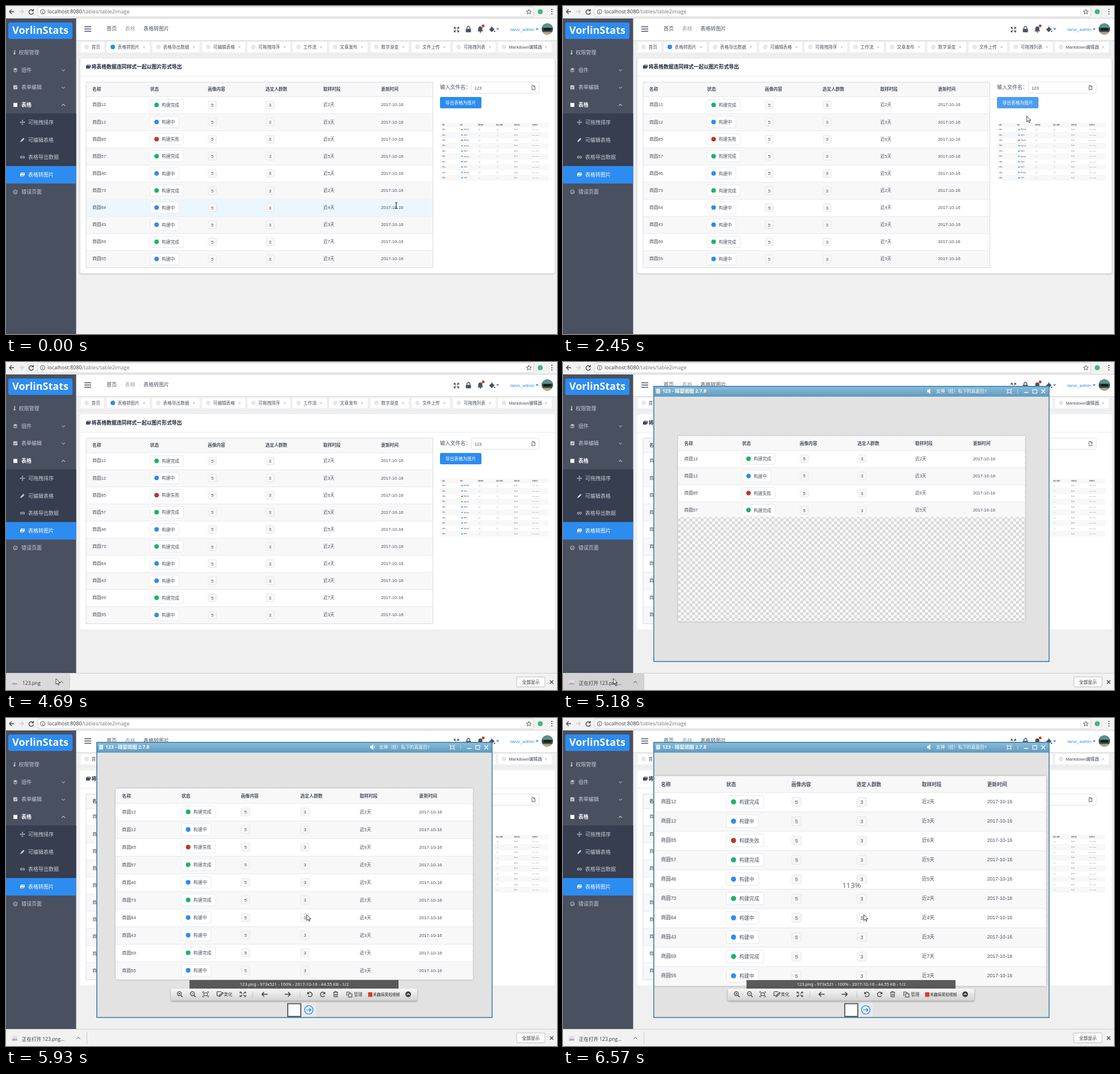
An HTML page that plays this animation: 970x577 px, repeating every 6670 ms.

```html
<!DOCTYPE html>
<html lang="zh">
<head>
<meta charset="utf-8">
<style>
html, body { margin: 0; width: 100%; height: 100%; overflow: hidden; background: #f0f0f0; }
svg { display: block; width: 100%; height: 100%; }
text { font-family: 'Liberation Sans', 'Noto Sans CJK SC', 'Noto Sans CJK', sans-serif; white-space: pre; }
.ui { font-family: 'Open Sans', 'Noto Sans CJK SC', 'Noto Sans CJK', sans-serif; }
.info { font-family: 'Noto Sans', sans-serif; }
</style>
</head>
<body>
<svg id="stage" viewBox="0 0 970 577"></svg>
<script>
const LOOP = 6670, BLUE = '#2d8cf0', INK = '#495060', LINE = '#e3e5e8';
const COLS = [152, 253.7, 355.2, 456.8, 558.5, 660.2];
const ROW = 30.1, TOP = 159.5;

// Drawing helpers; text is placed by its vertical centre.
const text = (x, y, s, size = 7.7, fill = INK, more = '') =>
  `<text x="${x}" y="${y + size * .36}" font-size="${size}" fill="${fill}" ${more}>${s}</text>`;
const rect = (x, y, w, h, fill, more = '') =>
  `<rect x="${x}" y="${y}" width="${w}" height="${h}" fill="${fill}" ${more}/>`;
const dot = (x, y, r, fill, more = '') => `<circle cx="${x}" cy="${y}" r="${r}" fill="${fill}" ${more}/>`;
const line = (d, color = INK, w = 1, more = '') =>
  `<path d="${d}" fill="none" stroke="${color}" stroke-width="${w}" ${more}/>`;
const shape = (d, fill = INK, more = '') => `<path d="${d}" fill="${fill}" ${more}/>`;
const at = (x, y, body) => `<g transform="translate(${x} ${y})">${body}</g>`;
const group = (id, body, more = '') => `<g id="${id}" ${more}>${body}</g>`;
const border = (c, r = 2) => `stroke="${c}" stroke-width=".8" rx="${r}"`;
const cross = (x, y, r, color, w) =>
  line(`M${x - r} ${y - r}l${2 * r} ${2 * r}m0 ${-2 * r}l${-2 * r} ${2 * r}`, color, w);
const chevron = (x, y, up, color) => line(`M${x - 3} ${y + up}l3 ${-2 * up * 1.4}l3 ${2 * up * 1.4}`, color, 1);
const picture = color =>
  line('M-2.5 -1.5V-3H3.5V1.5', color, 1) + rect(-4, -1.6, 6.5, 4.6, color) + shape('M-3 2l1.5-2 1.2 1 1-.8 1 1.8z', '#777e8c');

function browserBar() {
  return rect(0, 0, 970, 22, '#f2f2f2') + rect(56, 1.5, 873, 17.5, '#fff', border('#c4c4c4')) +
    line('M0 21.5H970', '#d0d0d0') +
    line('M14 10H6M10 6L6 10l4 4', '#444', 1.3) + line('M23 10h8M27 6l4 4-4 4', '#ccc', 1.3) +
    group('reload', line('M47.5 8A4 4 0 1 0 48.3 11.5', '#444', 1.4) + shape('M48.8 5v4.2h-4.2z', '#444')) +
    group('stop', cross(44, 10, 3.4, '#444', 1.4)) +
    dot(64.5, 10, 4, 'none', 'stroke="#555" stroke-width="1"') + line('M64.5 9.5v3M64.5 7.5v1', '#555', 1) +
    text(73, 10, 'localhost:8080<tspan fill="#777">/tables/table2image</tspan>', 9, '#333', 'class="ui"') +
    line('M920.5 5.8l1.2 3 3.2.2-2.5 2 .8 3.1-2.7-1.7-2.7 1.7.8-3.1-2.5-2 3.2-.2z', '#444', .9) +
    dot(940.5, 10, 4.5, '#41b883') + [6, 10, 14].map(y => dot(961, y, 1, '#444')).join('');
}

function sidebar() {
  const soft = '#c9ccd2', W = 123.5;
  const icons = [
    at(15, 81.5, line('M0-4V1M0-3h1.5M0-1h1.5', soft, 1) + dot(0, 2.2, 1.6, soft)),
    at(16.5, 112.5, shape('M0-3.5L4-1.5 0 .5-4-1.5z', soft) + line('M-3.6.6L0 2.4 3.6.6M-3.6 2L0 3.8 3.6 2', soft, .8)),
    at(16.5, 143, rect(-3.5, -3.5, 7, 7, soft) + line('M-2 0l1.5 1.6L2.3-1.6', INK, 1)),
    rect(13, 170.5, 7, 7, '#fff'),
    at(29, 204.5, line('M-4 0H4M0-4V4M-2.8-1.2L-4 0l1.2 1.2M2.8-1.2L4 0 2.8 1.2M-1.2-2.8L0-4l1.2 1.2M-1.2 2.8L0 4l1.2-1.2', soft, .9)),
    at(29, 235.5, shape('M-3.8 3.8l.7-2.6L1.6-3.5 3.5-1.6-1.2 3.1z', soft)),
    at(29, 266, line('M-.5-1.8H-2a1.8 1.8 0 0 0 0 3.6h1.2M.5-1.8H2a1.8 1.8 0 0 1 0 3.6H.8M-1.8 0h3.6', soft, 1)),
    at(29, 296.5, picture('#fff')),
    at(16.5, 327, dot(0, 0, 3.4, 'none', `stroke="${soft}"`) + line('M-1.5-1h.8M.7-1h.8M-1.5 1.7q1.5-1.8 3 0', soft, .9)),
  ];
  const items = [[22.5, 81.5, '权限管理'], [27, 112.5, '组件'], [27, 143, '表单编辑'], [39, 204.5, '可拖拽排序'],
    [39, 235.5, '可编辑表格'], [39, 266, '表格导出数据'], [27, 327, '错误页面']];
  return rect(0, 22, W, 555, INK) + rect(0, 189, W, 93, '#363e4f') + rect(0, 281.5, W, 30.8, BLUE) +
    rect(4, 29, 113, 29, BLUE, 'rx="3"') +
    text(60.5, 43, 'VorlinStats', 18, '#fff', 'class="ui" font-weight="700" text-anchor="middle"') +
    icons.join('') + items.map(([x, y, s]) => text(x, y, s, 9, soft)).join('') +
    text(27, 174, '表格', 9, '#fff', 'font-weight="700"') + text(39, 296.5, '表格转图片', 9, '#fff', 'font-weight="500"') +
    chevron(101, 112.5, -1, soft) + chevron(101, 143, -1, soft) + chevron(101, 174.5, 1, '#fff');
}

function header() {
  const icons = at(793, 41.5, line('M-1 -1L-4-4M1-1L4-4M-1 1L-4 4M1 1L4 4', INK, 1.2) +
      line('M-4-1.5V-4h2.5M4-1.5V-4H1.5M-4 1.5V4h2.5M4 1.5V4H1.5', INK, 1.3)) +
    at(814, 41, rect(-4.5, -.8, 9, 6, INK, 'rx=".8"') + line('M-2.6 0V-2.4a2.6 2.6 0 0 1 5.2 0V0', INK, 1.3)) +
    at(835, 41, shape('M-5 3.5l1.4-2V-1.5a3.6 3.6 0 0 1 7.2 0V1.5l1.4 2z') + dot(0, 4.6, 1.3, INK)) +
    dot(840, 35, 2.5, '#d0401c') +
    at(855.5, 41, shape('M-5 .5L0-4.5 4.5 0-.5 5z') + line('M0-4.5l-1.5-1.2', INK, 1) + dot(4.6, 3.5, 1.2, INK));
  const caret = x => shape(`M${x - 2.7} 39.3h5.4l-2.7 3.2z`, BLUE);
  return rect(123, 22, 847, 38, '#fff') + rect(123, 60, 847, 1.4, '#dedede') +
    line('M138 36.5h12M138 40.5h12M138 44.5h12', INK, 1.4) +
    text(177, 40, '首页', 9, INK, 'font-weight="500"') + text(202, 40, '/', 8, '#dddee1') + text(209.5, 40, '表格', 9, '#9a9fa8') +
    text(234.5, 40, '/', 8, '#dddee1') + text(242, 40, '表格转图片', 9, INK, 'font-weight="500"') +
    icons + caret(865.5) + text(888, 41, 'tarvo_admin', 7.7, BLUE) + caret(935) +
    dot(953, 40.5, 10, '#34504c') + shape('M943.3 38a10 10 0 0 1 19.4 0z', '#5d9189') +
    rect(946, 39, 14, 4, '#151c1c', 'rx="2"') + shape('M944.5 45.8h17a10 10 0 0 1-17 0z', '#b8a884');
}

function tabs() {
  const names = ['首页', '表格转图片', '表格导出数据', '可编辑表格', '可拖拽排序', '工作流', '文章发布', '数字渐变', '文件上传', '可拖拽列表', 'Markdown编辑器'];
  const starts = [131, 177, 257, 345, 424.5, 504, 568.5, 641, 713.5, 786, 865.7];
  return rect(123, 61, 847, 25, '#f0f0f0') + line('M123 85.5H970', '#e6e6e6') + names.map((s, i) => {
    const x = starts[i], w = i == 10 ? 57.5 : s.length * 7.7, end = x + 19.5 + w;
    return rect(x, 62.5, i ? w + 38 : 42.5, 19.5, '#fff', border('#e9eaec', 1.5)) +
      dot(x + 11, 72, 4, i == 1 ? BLUE : '#e6e7e9') + text(x + 19.5, 72.3, s) +
      (i ? cross(end + 8, 72.3, 1.8, '#aaa', .8) : '');
  }).join('');
}

// Table backdrop and contents are separate so that the hover colour fits between them.
function tableDefs() {
  const heads = ['名称', '状态', '画像内容', '选定人群数', '取样时段', '更新时间'];
  const ids = [12, 12, 85, 57, 46, 73, 64, 43, 69, 55], days = [2, 3, 6, 5, 5, 2, 4, 3, 7, 3];
  const kinds = [0, 1, 2, 0, 1, 0, 1, 1, 0, 1];
  const looks = [['构建完成', '#19b566'], ['构建中', BLUE], ['构建失败', '#b83a25']];
  let back = rect(141, 134, 611, 326.5, '#fff') + rect(141, 134, 611, 25.5, '#f8f8f9');
  let body = heads.map((s, i) => text(COLS[i], 146.5, s, 7.7, INK, 'font-weight="700"')).join('');
  const chip = (x, y, s) => rect(x + .8, y - 7, 14.5, 14, '#f7f7f7', border(LINE)) +
    text(x + 8, y + .3, s, 7.7, INK, 'text-anchor="middle"');
  ids.forEach((id, i) => {
    const y = TOP + ROW * i, c = y + 14.5, [label, color] = looks[kinds[i]];
    if (i % 2) back += rect(141, y, 611, ROW, '#f8f8f9');
    back += line(`M141 ${y}h611`, LINE, .8);
    body += text(COLS[0], c - .3, '商圆' + id) +
      rect(COLS[1], c - 9.8, 27.5 + label.length * 7.7, 19.6, '#fff', border(LINE)) +
      dot(COLS[1] + 11.4, c, 4, color) + text(COLS[1] + 20.6, c + .4, label) +
      chip(COLS[2], c, 5) + chip(COLS[3], c, 3) +
      text(COLS[4], c - .3, `近${days[i]}天`) + text(COLS[5], c - .3, '2017-10-16');
  });
  return group('back', back) + group('body', body);
}
const table = '<use href="#back"/><use href="#body"/>';

function card() {
  return rect(130.5, 93, 835.5, 378, '#000', 'id="shadow" filter="url(#soft)"') +
    rect(130.5, 92, 835.5, 378.5, '#fff', 'rx="2.5"') + line('M130.5 123.5h835.5', '#e9eaec') +
    at(145, 107, picture('#1c2438')) +
    text(150.5, 107, '将表格数据连同样式一起以图片形式导出', 8.85, '#1c2438', 'font-weight="700"') +
    '<use href="#back"/>' + group('rows', ROWS.map(i => rect(141, TOP + ROW * i + .4, 611, ROW - .8, '#ebf7ff')).join('')) +
    '<use href="#body"/>' + rect(141, 134, 610.5, 326.5, 'none', 'stroke="#d8dadd"') +
    text(764, 143, '输入文件名：', 9) + rect(819.5, 134, 119, 19.5, '#fff', border('#d8dadd', 2.5)) +
    text(824.8, 143.8, '123') + line('M926 139.8h3.2l2 2v5.4H926zM929 140v2h2', INK, .9) +
    rect(764, 160, 73, 20, BLUE, 'id="button" rx="2.5"') +
    text(800.5, 170, '导出表格为图片', 7.7, '#fff', 'text-anchor="middle"') +
    `<g transform="translate(719.9 163.1) scale(.3126)">${table}</g>`;
}

function shelf() {
  return rect(0, 547, 970, 31, '#f2f2f2') + line('M0 547.5H970', '#d0d0d0') +
    rect(0, 548, 143, 29, '#d2d2d2', 'id="chipBg"') + rect(10.5, 559.5, 9.5, 8, '#e6dde8') +
    shape('M10.5 566l3-2.5 2.5 1.5 2-1 2 1.5v2h-9.5z', '#b5a3bd') +
    group('saved', text(29, 564.5, '123.png', 8.5, '#333', 'class="ui"') + chevron(97.5, 563.5, 1, '#444') + line('M112.5 552v22', '#ccc')) +
    group('opening', text(28, 564.5, '正在打开 123.png...', 8.5, '#333', 'class="ui"') + chevron(127.5, 563.5, 1, '#444') + line('M142.5 552v22', '#ccc')) +
    rect(899, 554, 50, 17.5, '#fbfbfb', border('#b0b0b0')) + text(924, 563, '全部显示', 7.8, '#333', 'text-anchor="middle"') +
    cross(960.5, 563, 3, '#444', 1.4);
}

function toolbar() {
  const K = '#3c3c3c';
  const lens = (x, plus) => dot(x - .8, 485, 3.6, 'none', `stroke="${K}" stroke-width="1.2"`) +
    line(`M${x + 2} 488l2.8 2.8`, K, 1.6) + line(`M${x - 2.6} 485h3.6${plus ? 'm-1.8-1.8v3.6' : ''}`, K, 1);
  const turn = (x, dir) => at(x, 486, `<g transform="scale(${dir} 1)">` +
    line('M-3.4-2A4 4 0 1 1-3.4 2.4', K, 1.3) + shape('M-4.6-4.5v4.2h4.2z', K) + '</g>');
  const arrow = (x, dir) => line(`M${x - 5 * dir} 486h${10 * dir}m${-4 * dir}-4l${4 * dir} 4l${-4 * dir} 4`, K, 1.5);
  const dots = x => [481.5, 484.5, 487.5, 490.5].map(y => rect(x, y, 1, 1, '#888')).join('');
  return rect(323, 461, 368, 15, '#4b4b4b', 'opacity=".9"') +
    text(507.5, 468.5, '123.png - 973x521 - 100% - 2017-10-16 - 44.55 KB - 1/2', 7.55, '#f4f4f4', 'class="info" text-anchor="middle"') +
    rect(290, 477.5, 434, 21, '#555', 'rx="2" opacity=".6" filter="url(#soft)"') +
    rect(290, 476, 434, 21.5, 'url(#bar)', 'rx="2"') +
    lens(306, true) + lens(329, false) +
    at(351.5, 486, rect(-3, -2.5, 6, 5, 'none', `stroke="${K}"`) + line('M-5-2.5V-4.5h2M5-2.5V-4.5H3M-5 2.5v2h2M5 2.5v2H3', K, 1)) +
    line('M379 481.5h-7.5v7h3M375 490l1-2.5 5-5 1.5 1.5-5 5z', K, 1.1) + text(383.5, 486, '美化', 7.5, K) +
    at(417, 486, line('M-1-1L-4.5-4M1-1L4.5-4M-1 1L-4.5 4M1 1L4.5 4M-5-1.5V-4h2.5M5-1.5V-4H2.5M-5 1.5V4h2.5M5 1.5V4H2.5', K, 1.2)) +
    dots(434) + arrow(455.5, -1) + arrow(495.5, 1) + dots(517) + turn(535, 1) + turn(557.5, -1) +
    line('M576 482.5h8.5M578.8 482v-1h3v1M577.2 483v7.5h6.2V483M579.2 485v4M581.4 485v4', K, 1) +
    line('M600 489v-7h4l1 1.5h2M603 485h6v6h-6z', K, 1.1) + text(612.5, 486, '管理', 7.5, K) +
    rect(637.5, 482.5, 7.5, 8, '#d8392f') + text(646, 486.3, '禾趣搞笑短视频', 6.8, '#222') +
    dot(708, 486, 5, K) + line('M705.5 487.2l2.5-2.4 2.5 2.4', '#fff', 1.2);
}

function viewer() {
  const W = '#fff';
  return rect(159.8, 42.8, 695.9, 484, '#e2e2e2') +
    `<g clip-path="url(#pane)">` +
    group('photo', rect(202.5, 130.3, 611, 326.5, '#000', 'opacity=".25" filter="url(#soft)"') +
      rect(202.5, 130.3, 611, 326.5, 'url(#check)') +
      `<g clip-path="url(#loaded)" transform="translate(61.5 -3.7)">${table}</g>`) + '</g>' +
    text(508, 294, '113%', 13, '#6a6a6a', 'id="percent" class="info" text-anchor="middle" stroke="#fff" stroke-width="1.6" paint-order="stroke"') +
    group('tools', toolbar()) +
    group('thumbs', rect(520, 501.5, 25.5, 24, '#ebebeb') + rect(496, 502.5, 23, 22.5, '#fcfcfc', 'stroke="#5d6166" stroke-width="2"') +
      dot(533, 513.5, 7.3, W, `stroke="${BLUE}" stroke-width="1.5"`) + line('M528.5 513.5h8.5m-3.2-3.3l3.3 3.3-3.3 3.3', BLUE, 1.5)) +
    rect(159.8, 42.8, 695.9, 18.2, 'url(#title)') + rect(159.8, 42.8, 695.9, 484, 'none', 'stroke="#3f7fa8" stroke-width="1.6"') +
    rect(164, 47, 7, 8.5, '#d5e8f3') +
    text(175, 51.3, '123 - 晴窗阅图 2.7.8', 8.5, W, 'class="ui" font-weight="700"') +
    shape('M641 49.3h2l3.5-3v10l-3.5-3h-2z', W) +
    line('M648 49q1.6 2.3 0 4.6', W, 1, 'id="sound"') +
    text(657, 51.3, '女神（经）私下的真面目?', 7.7, W) +
    at(785.5, 51.5, line('M-3-2.5H3v5H-3zM-4.5-4.5l1.5 2M4.5-4.5L3-2.5M-4.5 4.5l1.5-2M4.5 4.5L3 2.5', W, 1)) +
    line('M800.5 47.5v8', '#a9cde0') + line('M811.5 53.5h8', W, 1.5) +
    rect(827, 48.5, 7, 6.5, 'none', `stroke="${W}" stroke-width="1.1"`) + cross(845.5, 51.5, 3.4, W, 1.4);
}

const ROWS = [...Array(10).keys()];
const stage = document.getElementById('stage');
const stops = (id, a, b) => `<linearGradient id="${id}" x2="0" y2="1"><stop stop-color="${a}"/><stop offset="1" stop-color="${b}"/></linearGradient>`;
stage.innerHTML = '<defs>' + tableDefs() + stops('title', '#8bbdd9', '#5f9abf') + stops('bar', '#f8f8f8', '#d2d2d2') +
  '<filter id="soft"><feGaussianBlur stdDeviation="1.8"/></filter>' +
  `<pattern id="check" x="202.5" y="130.3" width="10" height="10" patternUnits="userSpaceOnUse">${rect(0, 0, 10, 10, '#d6d6d6') + shape('M0 0h5v10h5V5H0z', '#fff')}</pattern>` +
  `<clipPath id="pane">${rect(161, 61, 694, 465, '#000')}</clipPath>` +
  `<clipPath id="loaded">${rect(141, 134, 611, 0, '#000', 'id="loadedBox"')}</clipPath></defs>` +
  rect(0, 0, 970, 577, '#f0f0f0') + card() + tabs() + header() + sidebar() + browserBar() + group('shelf', shelf()) +
  group('drop', dot(0, 0, 22.5, '#eef0f3', 'opacity=".92"') +
    shape('M-3-8h6v6h4L0 5.5-7-2h4z', '#3b86f0') + line('M-10.5 14.5h21', '#3b86f0', 2.4)) +
  group('viewer', viewer()) +
  group('cursor',
    shape('M0 0V10.2L2.4 8 4 11.6 5.6 10.9 4 7.4H7.3z', '#fff', 'id="arrow" stroke="#111" stroke-width=".8"') +
    line('M-2.2-5.2H-.6L0-4.6.6-5.2H2.2M0-4.6V4.6M-2.2 5.2H-.6L0 4.6.6 5.2H2.2', '#111', 1, 'id="beam"') +
    shape('M-1 0Q0-1 1 0V4l4 1q1 .3 1 1.5L5 12H0L-3.5 7.5q0-1.5 2.5 0z', '#fff', 'id="hand" stroke="#111" stroke-width=".8"'));

const el = {};
stage.querySelectorAll('[id]').forEach(e => el[e.id] = e);
const rowEls = [...el.rows.children];
const set = (id, name, v) => el[id].setAttribute(name, v);
const show = (id, on) => set(id, 'opacity', +on);
const ramp = (t, a, b) => Math.min(1, Math.max(0, (t - a) / (b - a)));
const ease = k => k * k * (3 - 2 * k);

const PATH = [[90, 687, 351], [750, 761, 255], [810, 763, 252], [1420, 838, 158], [1520, 838, 158], [1770, 815, 166],
  [2120, 815, 166], [2400, 816, 179], [2450, 818, 193], [2760, 370, 406], [3210, 136, 516], [4090, 136, 516],
  [4690, 88, 557], [5180, 88, 557], [5410, 188, 509], [5800, 529.5, 346]];
function pointer(t) {
  const i = PATH.findIndex(k => k[0] > t);
  if (i == 0) return PATH[0].slice(1);
  if (i < 0) return PATH[PATH.length - 1].slice(1);
  const [a, x, y] = PATH[i - 1], [b, u, v] = PATH[i], k = ramp(t, a, b);
  return [x + (u - x) * k, y + (v - y) * k];
}
const inside = ([x, y], l, t, r, b) => x >= l && x <= r && y >= t && y < b;

// A 200 ms linear fade equals the share of that span spent over the box.
function hover(t, ...box) {
  let n = 0;
  for (let i = 0; i < 20; i++) n += inside(pointer(t - i * 10), ...box);
  return n / 20;
}
const mix = (a, b, k) => `rgb(${a.map((v, i) => Math.round(v + (b[i] - v) * k))})`;

function draw(t) {
  const p = pointer(t), page = t < 4700;
  const overButton = inside(p, 764, 160, 837, 180), overText = t < 800 && p[0] < 699;
  set('cursor', 'transform', `translate(${p})`);
  show('beam', overText);
  show('hand', overButton);
  show('arrow', !overText && !overButton);

  rowEls.forEach((r, i) => r.setAttribute('opacity', page ? hover(t, 141, TOP + ROW * i, 752, TOP + ROW * (i + 1)) : 0));
  set('shadow', 'opacity', page ? .3 * hover(t, 130, 92, 966, 470) : 0);
  set('button', 'fill', t >= 1960 && t < 2120 ? '#2b85e4' :
    mix([45, 140, 240], [87, 163, 243], page ? hover(t, 764, 160, 837, 180) : 0));

  const loading = t >= 2550 && t < 2700;
  show('stop', loading);
  show('reload', !loading);

  set('shelf', 'transform', `translate(0 ${31 * (1 - ease(ramp(t, 3390, 3580)))})`);
  set('drop', 'transform', `translate(20.5 ${523.5 + 19 * ramp(t, 3390, 3640) + 12 * ramp(t, 3700, 4040)})`);
  set('drop', 'opacity', ramp(t, 3370, 3500) * (1 - ramp(t, 3700, 4040)));
  const opened = t >= 4790;
  show('saved', !opened);
  show('opening', opened);
  set('chipBg', 'width', opened ? 143 : 112);
  set('chipBg', 'opacity', hover(t, 0, 547, 143, 577));

  show('viewer', t >= 4940);
  set('loadedBox', 'height', 326.5 * ramp(t, 5060, 5338));
  const s = 1 + .13 * ramp(t, 5860, 6175);
  set('photo', 'transform', `translate(529.5 346) scale(${s}) translate(-529.5 -346)`);
  show('percent', t >= 6000);
  show('sound', t >= 5500 && t < 6150);
  show('thumbs', t >= 5400);
  set('tools', 'opacity', ramp(t, 5380, 5560));
}

const start = performance.now();
function tick() {
  draw((performance.now() - start) % LOOP);
  requestAnimationFrame(tick);
}
tick();
</script>
</body>
</html>
```
